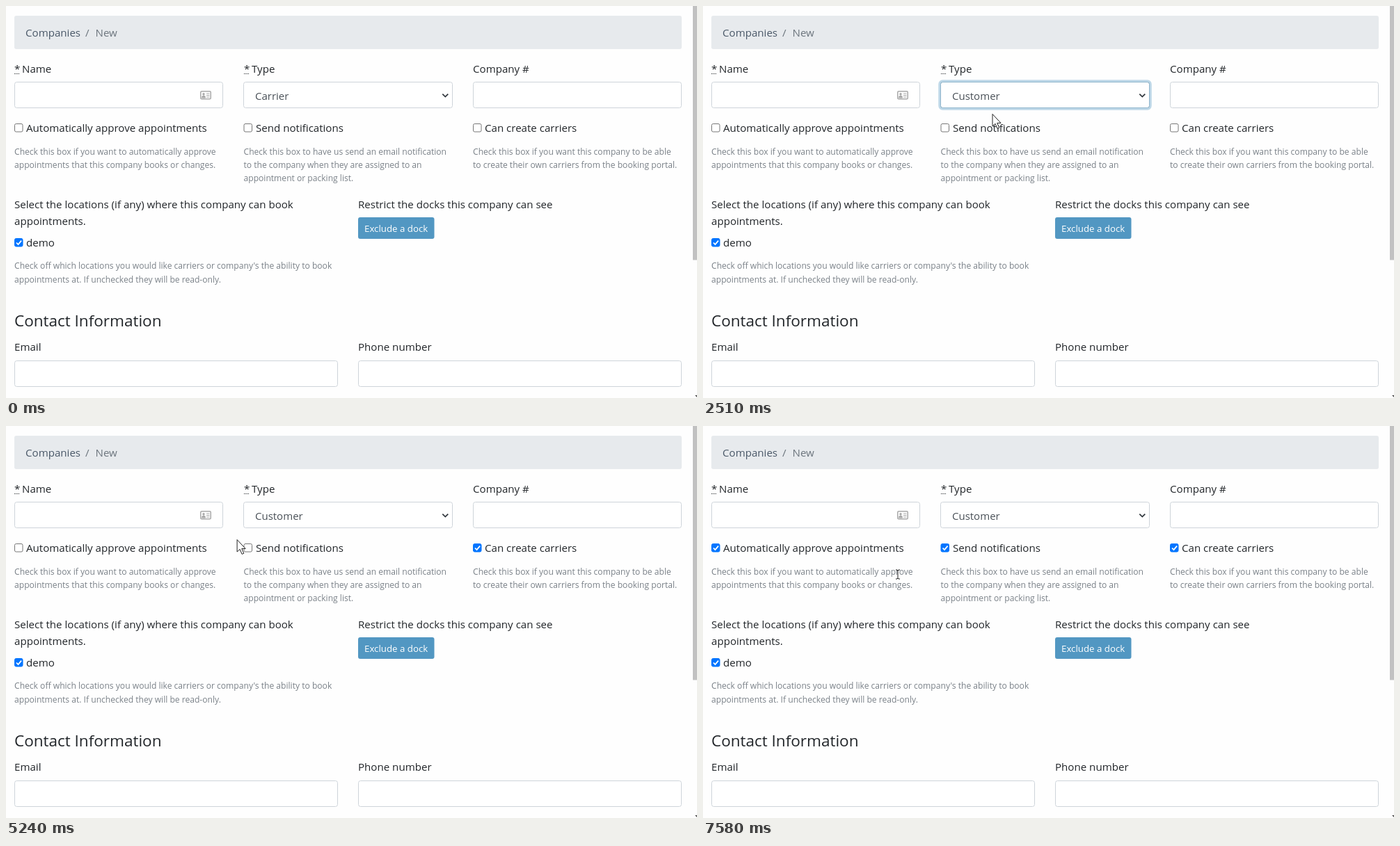
An HTML page for the animation above (8000 ms loop, 993 by 564 pixels).

```html
<!DOCTYPE html>
<html lang="en">
<head>
<meta charset="utf-8">
<title>New company form</title>
<style>
html, body { margin: 0; width: 100%; height: 100%; overflow: hidden; background: #fefefe; }
svg { display: block; width: 993px; height: 564px; font-family: "Open Sans", "Noto Sans", sans-serif; }
text { font-size: 15.1px; fill: #212529; white-space: pre; }
.help { font-size: 12.1px; fill: #7a8188; }
.title { font-size: 22.5px; }
.value { font-size: 15px; fill: #495057; }
.crumb { fill: #4a5868; }
.muted { fill: #6c757d; }
.button { font-size: 13.3px; fill: #fff; }
.url { font-size: 10.25px; fill: #6b7076; }
.field { fill: #fff; stroke: #ced4da; }
.light { fill: #fff; }
</style>
</head>
<body>
<svg id="stage">
  <rect x="12" y="14" width="959" height="48" rx="3" fill="#e7eaed"/>
  <g id="form"></g>
  <g fill="none" stroke="#212529" stroke-dasharray="1 1">
    <path d="M12 97.5h7M342 97.5h7"/>
  </g>
  <g transform="translate(279 122)">
    <rect x=".75" y=".75" width="14.5" height="11" rx="1.5" fill="#fff" stroke="#a9a9a9" stroke-width="1.5"/>
    <path d="M2.5 10c0-4 5-4 5 0zM9 4h4.5M9 6.5h4.5M9 9h4.5" fill="#a9a9a9" stroke="#a9a9a9"/>
    <circle cx="5" cy="4.8" r="1.7" fill="#a9a9a9"/>
  </g>
  <g id="ring" fill="none">
    <rect x="339.9" y="107.9" width="303.2" height="40.2" rx="4.5" stroke="#5499c3" stroke-opacity=".38" stroke-width="3.2"/>
    <rect x="341.5" y="109.5" width="300" height="37" rx="3" stroke="#8fb5cc"/>
  </g>
  <text id="choice" class="value" x="358" y="135"></text>
  <path d="M627.3 126.6l4 4 4-4" fill="none" stroke="#343a40" stroke-width="1.8"/>
  <rect id="button" x="506" y="304" width="109.5" height="31" rx="3"/>
  <text class="button" x="515" y="325">Exclude a dock</text>
  <g id="checks"></g>
  <g id="menu">
    <rect x="343" y="149" width="300" height="69" fill="#000" opacity=".12"/>
    <rect x="341.5" y="147.5" width="299" height="68" fill="#fff" stroke="#767b80"/>
    <rect id="highlight" x="342" width="298" height="22.5" fill="#1e90ff"/>
    <g id="options"></g>
  </g>
  <rect x="987" width="6" height="365.5" fill="#c1c1c1"/>
  <path d="M990 560h3v3z" fill="#505050"/>
  <g id="status">
    <path d="M0 549.5H281a3.5 3.5 0 0 1 3.5 3.5V564H0z" fill="#dee1e6" stroke="#cfd3d8"/>
    <text class="url" x="1" y="563">https://demo-marketing.datadocks.com/companies/new#</text>
  </g>
  <g id="cursor">
    <path id="arrow" d="M0 .5V18l4-3.7 3 7 2.7-1.1-3-6.8H12z" fill="#fff" stroke="#222"/>
    <path id="hand" d="M-1.5 10V1q1.5-2 3 0v6l9 2v6l-2 6H0l-5-8q0-2 2-1z" fill="#fff" stroke="#222"/>
    <path id="beam" d="M-3-6.5h2l1 1 1-1h2M-3 6.5h2l1-1 1 1h2M0-5.5v11" fill="none" stroke="#222"/>
  </g>
</svg>
<script>
const LOOP = 8000;
const $ = id => document.getElementById(id);

function add(parent, tag, attrs, content = '') {
  const node = document.createElementNS('http://www.w3.org/2000/svg', tag);
  for (const key in attrs) node.setAttribute(key, attrs[key]);
  node.textContent = content;
  return $(parent).appendChild(node);
}
const write = (parent, x, y, content, style = '') =>
  add(parent, 'text', { x, y, class: style }, content);

[[12, 109, 299], [341, 109, 300], [671, 109, 299], [12, 510, 464], [506, 510, 464]].forEach(([x, y, width]) =>
  add('form', 'rect', { x: x + .5, y: y + .5, width, height: 37, rx: 3, class: 'field' }));

[
  [28, 44, 'Companies', 'crumb'], [114, 44, '/', 'muted'], [128.5, 44, 'New', 'muted'],
  [12, 96, '*'], [23, 96, 'Name'], [342, 96, '*'], [353, 96, 'Type'], [671, 96, 'Company #'],
  [29, 181, 'Automatically approve appointments'],
  [359, 181, 'Send notifications'],
  [688, 181, 'Can create carriers'],
  [12, 214, 'Check this box if you want to automatically approve', 'help'],
  [12, 233, 'appointments that this company books or changes.', 'help'],
  [341.5, 214, 'Check this box to have us send an email notification', 'help'],
  [341.5, 233, 'to the company when they are assigned to an', 'help'],
  [341.5, 252, 'appointment or packing list.', 'help'],
  [671, 214, 'Check this box if you want this company to be able', 'help'],
  [671, 233, 'to create their own carriers from the booking portal.', 'help'],
  [12, 291, 'Select the locations (if any) where this company can book'],
  [12, 315, 'appointments.'],
  [506, 291, 'Restrict the docks this company can see'],
  [29, 346, 'demo'],
  [12, 378, "Check off which locations you would like carriers or company's the ability to book", 'help'],
  [12, 398, 'appointments at. If unchecked they will be read-only.', 'help'],
  [12, 461, 'Contact Information', 'title'],
  [12, 496, 'Email'], [506, 496, 'Phone number']
].forEach(item => write('form', ...item));

const options = ['Customer', 'Carrier', 'Both'].map((name, i) =>
  write('options', 358, 165 + i * 22.5, name, 'value'));

// Each checkbox: position, right end of its label, time it gets checked
const checks = [[12, 169, 289, 6380], [341.5, 169, 484, 5480], [671, 169, 818, 3840], [12, 334, 70, 0]]
  .map(([x, y, right, since]) => ({
    x, y, right, since,
    box: add('checks', 'rect', { x: x + .5, y: y + .5, width: 11.5, height: 11.5, rx: 2 }),
    tick: add('checks', 'path', {
      d: `M${x + 3} ${y + 6.5}l2.5 2.6 4.6-5.4`, fill: 'none', stroke: '#fff', 'stroke-width': 1.8
    })
  }));

// Pointer path: time, x, y
const path = [
  [390, 800, 548], [570, 700, 455], [750, 585, 345], [930, 549, 305], [1130, 445, 163],
  [1190, 441, 157], [1430, 428, 139], [1850, 427, 140], [1910, 428, 143], [2150, 416, 155],
  [2960, 416, 155], [3180, 526, 157], [3480, 642, 182], [3780, 677, 180], [3900, 681, 179],
  [4460, 681, 179], [4750, 520, 170], [5110, 321, 161], [5240, 332, 163], [5380, 347, 171],
  [5540, 347, 173], [5800, 270, 179], [6140, 222, 181], [6500, 202, 180], [6820, 202, 180],
  [7060, 250, 198], [7280, 280, 213.5], [LOOP, 280, 213.5]
];

function pointerAt(t) {
  const i = Math.max(1, path.findIndex(key => key[0] > t));
  const [t0, x0, y0] = path[i - 1], [t1, x1, y1] = path[i];
  const k = (t - t0) / (t1 - t0);
  return [x0 + (x1 - x0) * k, y0 + (y1 - y0) * k];
}

const show = (id, on) => $(id).style.display = on ? '' : 'none';
const ramp = (t, start, length) => Math.min(1, Math.max(0, (t - start) / length));

function draw(t) {
  const [x, y] = pointerAt(t);
  const inside = (left, top, right, bottom) =>
    t >= 390 && x >= left && x <= right && y >= top && y <= bottom;
  const open = t >= 1490 && t < 2510;
  const onButton = inside(506, 304, 616, 335);
  const onText = inside(12, 200, 303, 240);

  show('cursor', t >= 390);
  $('cursor').setAttribute('transform', `translate(${x} ${y})`);
  show('hand', onButton);
  show('beam', onText);
  show('arrow', !onButton && !onText);

  $('button').setAttribute('fill', onButton ? '#4288b3' : '#5297c2');
  show('status', t >= 770 && t < 1400);
  $('status').style.opacity = ramp(t, 760, 100) * (1 - ramp(t, 1250, 150));

  $('ring').style.opacity = ramp(t, 1370, 150) * (1 - ramp(t, 3840, 150));
  $('choice').textContent = t < 2510 ? 'Carrier' : 'Customer';
  show('menu', open);
  const active = t < 1970 ? 1 : 0;
  $('highlight').setAttribute('y', 147.8 + active * 22.3);
  options.forEach((option, i) => option.classList.toggle('light', i === active));
  options.forEach((option, i) => option.style.fill = i === active ? '#fff' : '');

  for (const c of checks) {
    const on = t >= c.since;
    const hover = !open && inside(c.x, c.y - 6, c.right, c.y + 18);
    const color = on ? (hover ? '#005cc8' : '#0075ff') : (hover ? '#4f4f4f' : '#767676');
    c.box.setAttribute('fill', on ? color : '#fff');
    c.box.setAttribute('stroke', color);
    c.tick.style.display = on ? '' : 'none';
  }
}

const start = performance.now();
function tick() {
  draw((performance.now() - start) % LOOP);
  requestAnimationFrame(tick);
}
tick();
</script>
</body>
</html>
```
